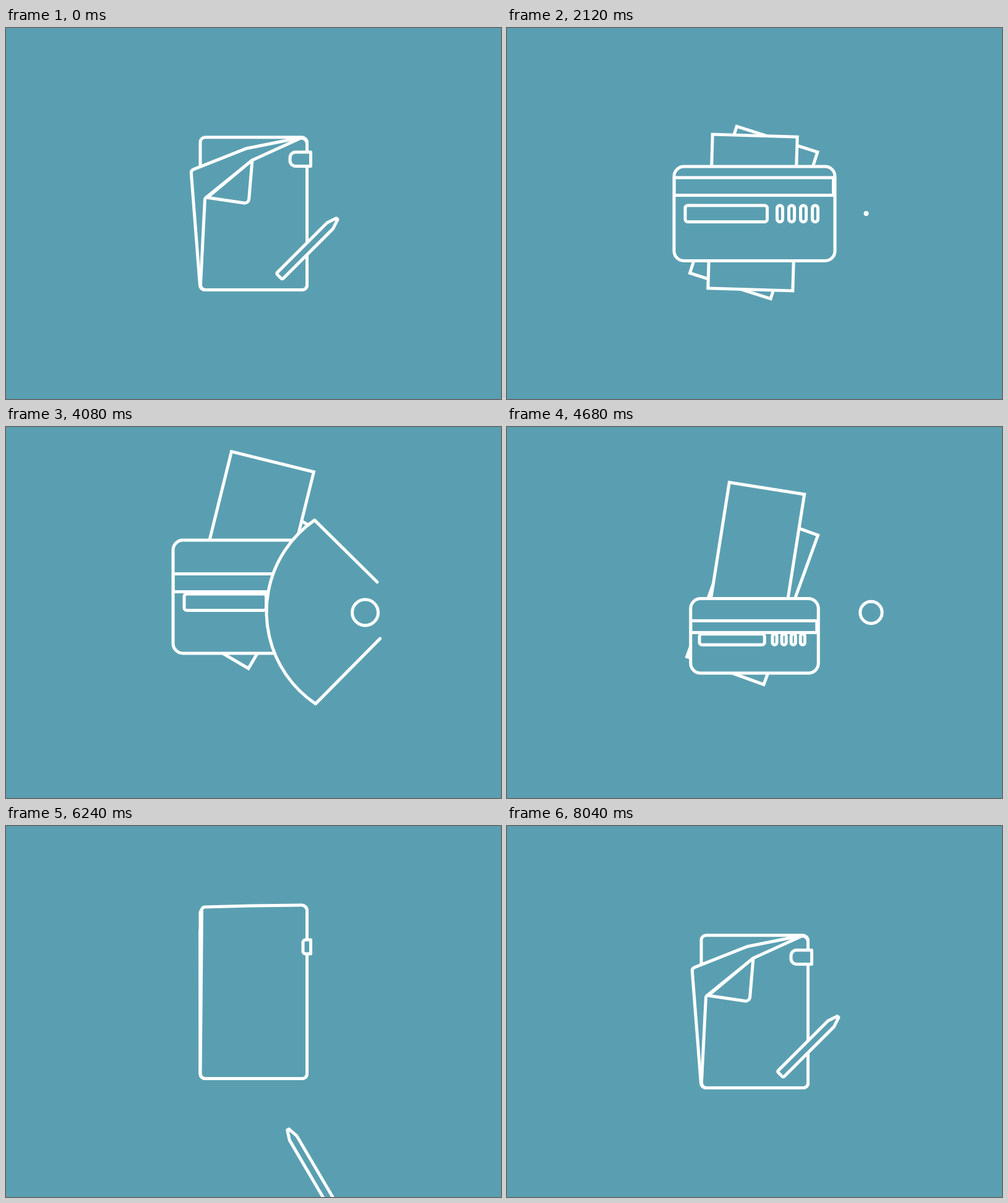
An HTML page with a canvas that plays this animation: 800 px wide and 600 px high, repeating every 8080 ms.

```html
<!DOCTYPE html>
<html>
<head>
<meta charset="utf-8">
<style>
html, body { margin: 0; height: 100%; overflow: hidden; background: #5a9fb1; }
canvas { display: block; }
</style>
</head>
<body>
<canvas id="stage" width="800" height="600"></canvas>
<script>
const ctx = document.getElementById('stage').getContext('2d');
const BG = '#5a9fb1', LOOP = 8080, RAD = Math.PI / 180;
const lerp = (a, b, p) => a + (b - a) * p;
let t = 0;

// Smooth progress from 0 to 1 between two times.
function ramp(from, to) {
  const p = Math.min(1, Math.max(0, (t - from) / (to - from)));
  return p * p * (3 - 2 * p);
}

function paint(join = 'round') {
  ctx.lineJoin = join;
  ctx.fill();
  ctx.stroke();
}

// Closed polygon; the third number of a point rounds its corner.
function polygon(points) {
  const first = points[0], last = points[points.length - 1];
  const start = [(first[0] + last[0]) / 2, (first[1] + last[1]) / 2];
  ctx.beginPath();
  ctx.moveTo(...start);
  points.forEach(([x, y, r = 0], i) => {
    const [nx, ny] = points[i + 1] || start;
    ctx.arcTo(x, y, nx, ny, r);
  });
  ctx.closePath();
  paint();
}

function box(x, y, w, h, r) {
  ctx.beginPath();
  ctx.roundRect(x, y, w, h, r);
  paint(r ? 'round' : 'miter');
}

function placed(x, y, angle, shape) {
  ctx.save();
  ctx.translate(x, y);
  ctx.rotate(angle * RAD);
  shape();
  ctx.restore();
}

function notebook() {
  const unfold = ramp(200, 600), turn = ramp(500, 1000), first = t < 1000;
  const wiggle = 0.06 * Math.sin(Math.PI * ramp(6900, 7600));
  const fold = first ? 1 - unfold : ramp(6240, 6860) - wiggle;
  const drop = first ? 1 - unfold + turn : ramp(6240, 6860);
  const squeeze = 1 - (first ? turn : 0);
  const right = 486.5, top = lerp(128, 176.7, drop), bottom = lerp(408.5, 423.5, drop);
  const pt = (x, y, r = 0) => [right + (x - right) * squeeze, y, r * squeeze];
  // A point that travels from the flat page to the folded page.
  const bend = (x0, y0, x1, y1, r) => pt(lerp(x0, x1, fold), top + lerp(y0, y1, fold), r);
  const edge = [pt(right, top, 9), pt(right, bottom, 8), pt(314, bottom, 8)];
  const crease = bend(397, 1, 398, 37);

  polygon([pt(314, top + 5 * (1 - fold), 8), ...edge]);
  polygon([bend(313.5, 36, 299, 53.5, 6), bend(389, 34, 389, 18), pt(474, top + 1), ...edge]);
  polygon([bend(316.5, 3, 321.5, 99, 5), crease, pt(476, top + 1.5 * fold), ...edge]);
  if (fold > 0.05) polygon([bend(316.5, 3, 325.5, 97.5), bend(317, 3, 392, 107.5, 7), crease]);

  const [left] = pt(lerp(480, 459, drop)), [end] = pt(492.5);
  const r = lerp(4, 9, drop) * squeeze;
  box(left, top + lerp(56, 24, drop), end - left, 22.7, [r, 0.1, 0.1, r]);
}

function pencil() {
  const out = ramp(200, 1000), shoot = ramp(1000, 1300);
  const rise = ramp(6080, 6400), swing = ramp(6240, 7100);
  const nudge = 4 * Math.sin(2 * Math.PI * ramp(7100, 8000));
  const [x, y, angle] = t < 2000
    ? [535 + 85 * out - 275 * shoot, 308.5 - 5.5 * out, -45 - 136.4 * out]
    : [456 + 79 * swing + 175 * Math.sin(Math.PI * swing) + nudge,
       612 - 240 * rise - 63.5 * swing - nudge, -120.4 + 75.4 * swing];
  placed(x, y, angle, () => polygon([
    [0, -1.5], [0, 1.5], [-16, 6.8], [-132, 6.8, 2], [-132, -6.8, 2], [-16, -6.8]]));
}

// The part of the pencil that has not yet passed through the notebook's edge.
function pencilBehindEdge() {
  ctx.save();
  ctx.beginPath();
  ctx.rect(485, 0, 315, 600);
  ctx.clip();
  pencil();
  ctx.restore();
}

function papers(enter, lift, fall) {
  const grow = ramp(5480, 6040), loose = 1 - fall;
  const x = 484.8 - 87.8 * enter + 4 * lift - 3.2 * fall + 2.2 * grow;
  const y = 298.5 - 121.5 * lift + 144 * fall - 53 * grow;
  const w = 2 + 135 * enter - 41.5 * fall + 77 * grow;
  const h = 230 + 19 * enter + 23 * fall + 8 * grow;
  const angle = -1.1 + 2.8 * enter + 12.2 * lift - 14.4 * fall + 0.5 * grow;
  const sheet = (w, r) => () => box(-w / 2, -h / 2, w, h, r);
  if (enter > 0 && loose > 0) {
    placed(x + (1.7 - 6.7 * lift) * loose, y + (71.5 * lift - 470 * (1 - enter)) * loose,
      angle + (16 + 0.6 * lift) * loose, sheet(lerp(137, w, fall), 0));
  }
  placed(x, y, angle, sheet(w, 8 * grow));
}

function card(lift, fall) {
  const open = ramp(1560, 2120), rise = 0.4 * ramp(2120, 2640) + 0.6 * lift;
  const half = (90 + 40 * open - 78.5 * fall) * (1 - ramp(5480, 5700)), s = half / 130;
  const at = (y, up) => lerp(lerp(300, y - up * rise, open), 460, fall);
  const top = at(224, 41), h = at(376.5, 10.5) - top;
  box(400 - half, top, half * 2, h, Math.min(16, h / 2) + 0.01);
  if (h < 8) return;
  ctx.save();
  ctx.clip();
  ctx.lineJoin = 'miter';
  const stripe = at(242, 4.5), field = at(287, 17), fieldH = at(313.5, 17) - field;
  ctx.strokeRect(400 - half, stripe, half * 2 - 2.5, at(270.5, 4) - stripe);
  box(400 - 112 * s, field, 132.5 * s, fieldH, 4);
  for (let i = 0; i < 4; i++) box(400 + (36.5 + i * 19) * s, field, 9 * s, fieldH, 4.5 * s);
  ctx.restore();
}

function flap(settle) {
  const size = ramp(2160, 2640) * (1 - ramp(4200, 4440)), gap = 325 * ramp(3940, 4480);
  if (size < 0.01) return;
  const sag = 78.5 - 5 * settle, r = (148.5 ** 2 + sag ** 2) / (2 * sag);
  const a = Math.asin(148.5 / r), q = Math.PI / 4;
  ctx.save();
  ctx.translate(580, 298.7);
  ctx.rotate(-0.3 * RAD);
  ctx.scale(size, size);
  ctx.beginPath();
  ctx.arc(0.5, 0, 47.7, -0.05, -q, true);
  ctx.lineTo(-80.5, -148.5);
  ctx.arc(-80.5 + r * Math.cos(a), 0, r, Math.PI + a, Math.PI - a, true);
  ctx.arc(0.5, 0, 47.7, q, -0.05, true);
  ctx.restore();
  ctx.save();
  // Trim the outline from the tip towards both ends of the arc.
  if (gap > 0.5) {
    ctx.setLineDash([(750 - 2 * gap) * size, 2000]);
    ctx.lineDashOffset = -gap * size;
  }
  paint();
  ctx.restore();
}

function button(settle) {
  const x = 412 - 225 * ramp(1120, 1360) + 393.5 * ramp(1360, 1760) + 47.5 * ramp(4400, 5480);
  const r = 1.5 + 19.5 * ramp(2120, 2600) - 18.5 * ramp(4400, 5440) - 2 * settle;
  ctx.beginPath();
  ctx.arc(x, 300, r, 0, 7);
  paint();
}

function wallet() {
  const enter = ramp(1200, 1640), lift = ramp(3560, 4080), fall = ramp(4320, 5240);
  const settle = ramp(2160, 2640) * Math.exp(-Math.max(0, t - 2640) / 250);
  if (t < 1300) pencilBehindEdge();
  papers(enter, lift, fall);
  if (t > 1560 && t < 5700) card(lift, fall);
  flap(settle);
  if (t > 1160 && t < 5560) button(settle);
}

function draw() {
  t = (performance.now() - start) % LOOP;
  ctx.fillStyle = BG;
  ctx.strokeStyle = '#fff';
  ctx.lineWidth = 5;
  ctx.lineCap = 'round';
  ctx.fillRect(0, 0, 800, 600);
  if (t >= 1000 && t < 6040) {
    wallet();
  } else {
    notebook();
    pencil();
  }
  requestAnimationFrame(draw);
}
const start = performance.now();
draw();
</script>
</body>
</html>
```
